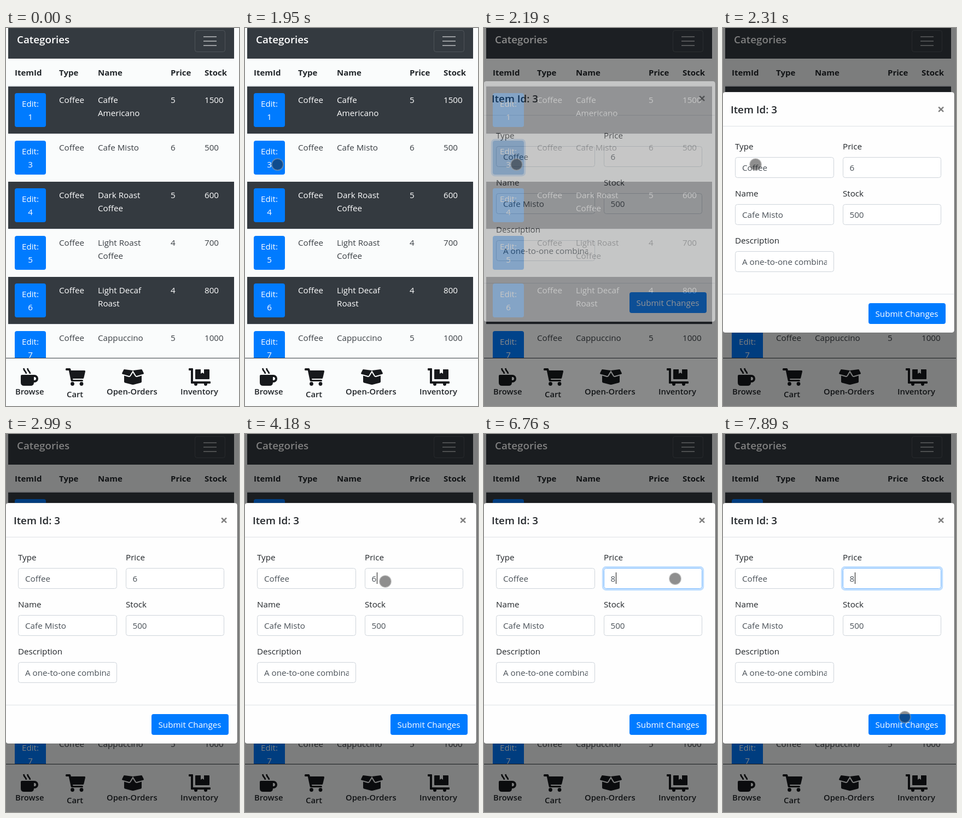
Write an HTML page that moves like this. It is 426 by 691 pixels and loops after 8 s.

```html
<!DOCTYPE html>
<html lang="en">
<head>
<meta charset="utf-8">
<title>Inventory editor</title>
<style>
  html, body { margin: 0; width: 100%; height: 100%; overflow: hidden; background: #fafcfc; }
  svg { display: block; }
  text { font: 15.2px "Open Sans", "Noto Sans", sans-serif; fill: #212529; white-space: pre; }
  .b { font-weight: 700; font-size: 15px; }
  .s { font-weight: 600; font-size: 14.8px; }
  .h { font-weight: 600; font-size: 18.8px; }
  .x { font-weight: 700; font-size: 24px; fill: #7f7f7f; }
  .w { fill: #fff; }
  .l { fill: #3a3f44; }
  .i { fill: #495057; }
  .m { text-anchor: middle; }
  .field { fill: #fff; stroke: #ced4da; }
  .icon { fill: #17191c; fill-rule: evenodd; }
</style>
</head>
<body>
<svg id="stage" width="426" height="691" viewBox="0 0 426 691"></svg>
<script>
const text = (x, y, s, cls = '') => `<text x="${x}" y="${y}" class="${cls}">${s}</text>`;
const box = (x, y, w, h, fill, r = 0, more = '') =>
  `<rect x="${x}" y="${y}" width="${w}" height="${h}" rx="${r}" fill="${fill}" ${more}/>`;
const disc = (x, y, r) => `<circle cx="${x}" cy="${y}" r="${r}"/>`;
const field = (x, y, w, id = '') => box(x + .5, y + .5, w - 1, 37, '', 4, `class="field" ${id}`);

const columns = [['ItemId', 16], ['Type', 97], ['Name', 168], ['Price', 301], ['Stock', 363]];
const items = [
  [1, 'Caffe|Americano', 5, 1500], [3, 'Cafe Misto', 6, 500],
  [4, 'Dark Roast|Coffee', 5, 600], [5, 'Light Roast|Coffee', 4, 700],
  [6, 'Light Decaf|Roast', 4, 800], [7, 'Cappuccino', 5, 1000]
];

function row([id, name, price, stock], i) {
  const y = 107 + 87 * i, dark = i % 2 === 0, cls = dark ? 'w' : 'l';
  const back = dark ? box(4, y, 413, 86, '#343a40') : box(4, y - 1, 413, 1, '#dee2e6');
  const ring = id === 3
    ? box(14.4, y + 10.4, 60.2, 65.2, 'none', 5.5, 'id="ring" stroke="#8fc4fb" stroke-width="3.2"') : '';
  return back + ring + box(16, y + 12, 57, 62, '#007bff', 4, `id="edit${id}"`) +
    text(44.5, y + 37, 'Edit:', 'w m') + text(44.5, y + 61, id, 'w m') +
    text(97, y + 30, 'Coffee', cls) +
    name.split('|').map((s, k) => text(168, y + 30 + 24 * k, s, cls)).join('') +
    text(301, y + 30, price, cls) + text(363, y + 30, stock, cls);
}

const icons = `<g class="icon">
  <path d="M27 636q0-2 2-2h23a7 7 0 0 1 0 14h-1q0 6-6 6h-12q-6 0-6-6zM51 638v6h1a3 3 0 0 0 0-6z"/>
  <path d="M32.3 622q.5 3.500 2.600 5.500t2.100 4.500m2.300-10q.5 3.500 2.600 5.500t2.100 4.500" fill="none" stroke="#17191c" stroke-width="2.700"/>
  <path d="M110.500 622h6q1.500 0 1.800 1.600l.5 2.400h24.700q1.900 0 1.500 1.900l-2.700 11.500q-.4 1.600-1.900 1.600h-18.300l.4 2h16.800q1.900 0 1.500 1.900l-.3 1.100h-20q-1.500 0-1.800-1.600l-3.900-18.400h-4.300q-1.500 0-1.500-1.500v-1q0-1.500 1.500-1.500z"/>
  ${disc(121.5, 650.5, 3.4)}${disc(138, 650.5, 3.4)}
  <path d="M232 626l-15.600-2q-.8 0-1.100.6l-3.200 6.400q-.4 1.100.6 1.500l12.400 3.500q.8.100 1.200-.5zM232 626l15.600-2q.8 0 1.100.6l3.200 6.400q.4 1.100-.6 1.500l-12.400 3.500q-.8.100-1.200-.5zM232 630l4 6.600q1.200 1.900 3.500 1.300l8.500-2.500v11.200q0 1.500-1.500 1.900l-13.500 3.400q-1 .2-2 0l-13.500-3.400q-1.500-.4-1.500-1.900v-11.200l8.500 2.500q2.300.6 3.500-1.300z"/>
  <path d="M335 622h6q1 0 1 1v23h31q1 0 1 1v2q0 1-1 1h-34q-1 0-1-1v-23h-3q-1 0-1-1v-2q0-1 1-1zM347 624h9v8l3-2 3 2v-8h9q1 0 1 1v16q0 1-1 1h-24q-1 0-1-1v-16q0-1 1-1z"/>
  ${disc(347, 651, 3)}${disc(365, 651, 3)}
</g>`;

const page = box(0, 0, 426, 691, '#fafcfc') + box(4, 0, 413, 56, '#343a40') +
  text(20, 28, 'Categories', 'h w') +
  box(345.5, 4.5, 55, 39, 'none', 4, 'stroke="#fff" stroke-opacity=".13"') +
  '<path d="M361 16h24m-24 8h24m-24 8h24" stroke="#fff" stroke-opacity=".5" stroke-width="2"/>' +
  columns.map(([s, x]) => text(x, 87, s, 'b')).join('') +
  box(4, 105, 413, 2, '#dee2e6') + items.map(row).join('') +
  box(0, 603, 426, 88, '#fafcfc') + box(0, 603, 426, 1, '#343a40') + icons +
  text(17, 670, 'Browse', 's') + text(111, 675, 'Cart', 's') +
  text(184, 670, 'Open-Orders', 's') + text(319, 670, 'Inventory', 's');

const dialog = box(-.5, 126, 423.5, 440, '#fefefe', 4.5, 'stroke="#000" stroke-opacity=".2"') +
  text(14, 165, 'Item Id: 3', 'h') + text(398.5, 165.5, '×', 'x m') +
  box(0, 188, 423, 1, '#dee2e6') + box(0, 495, 423, 1, '#dee2e6') +
  text(22, 231, 'Type') + text(219, 231, 'Price') + text(22, 317, 'Name') +
  text(219, 317, 'Stock') + text(22, 403, 'Description') +
  box(217.4, 243.4, 183.2, 41.2, 'none', 5.5, 'id="focus" stroke="#bfdeff" stroke-width="3.2"') +
  field(22, 245, 181) + field(219, 245, 180, 'id="price"') +
  field(22, 331, 181) + field(219, 331, 180) + field(22, 417, 181) +
  text(35, 270, 'Coffee', 'i') + '<text id="value" class="i" x="231.5" y="270"></text>' +
  text(35, 356, 'Cafe Misto', 'i') + text(231.5, 356, '500', 'i') +
  `<svg x="35" y="417" width="155" height="38">${text(0, 25, 'A one-to-one combination', 'i')}</svg>` +
  box(0, 253, 1, 21, '#111', 0, 'id="caret"') +
  box(266, 512, 141, 38, '#007bff', 4) + text(278.5, 537, 'Submit Changes', 'w');

document.getElementById('stage').innerHTML = page +
  box(0, 0, 426, 691, '#000', 0, 'id="shade"') + `<g id="dialog">${dialog}</g>` +
  '<circle id="pointer" r="10.5" fill="#1e1e1e" fill-opacity=".5" stroke="#a0a0a0" stroke-opacity=".5" stroke-width="2"/>';

// Held steps: [time, ...values]
const pointerSteps = [
  [0], [280, 275.5, 615], [430],
  [580, 205.5, 448.5], [700, 152, 376], [820, 108, 316], [940, 77, 274], [1060, 63, 254],
  [1180, 59.5, 249.5], [2990],
  [3240, 118.5, 256.5], [3360, 133.5, 260.5], [3510, 229.5, 269.5], [3660, 244.5, 269.5],
  [3810, 252, 269.5], [3930, 256.5, 269.5], [4320, 318.5, 266.5], [4470, 349.5, 264.5],
  [7260, 351.5, 260.5], [7530, 383, 302], [7650, 402.5, 388], [7770, 374, 478], [7890, 332.5, 517.5]
];
// shade, dialog opacity, dialog offset
const fadeSteps = [[0, 0, 0, -50], [2070, .39, 0, -50], [2190, .46, .52, -29], [2310, .5, 1, -9], [2460, .5, 1, 0]];
const caretSteps = [[0], [4180, 241], [4720], [5220, 241], [5620], [5740, 232], [6260], [6760, 241], [7260], [7770, 241]];
const valueSteps = [[0, '6'], [5740, ''], [6760, '8']];

const at = (steps, t) => steps.findLast(s => s[0] <= t).slice(1);
const el = id => document.getElementById(id);
const set = (id, attrs) => { for (const k in attrs) el(id).setAttribute(k, attrs[k]); };
const show = (id, on) => { el(id).style.display = on ? '' : 'none'; };

function draw(now) {
  const t = now % 8000;
  const [px, py] = at(pointerSteps, t), [shade, alpha, dy] = at(fadeSteps, t);
  const [caret] = at(caretSteps, t), pressed = t >= 2070, focused = t >= 4320;
  show('pointer', px !== undefined);
  if (px !== undefined) set('pointer', { cx: px, cy: py });
  set('shade', { opacity: shade });
  set('dialog', { opacity: alpha, transform: `translate(0 ${dy})` });
  show('ring', pressed);
  set('edit3', { fill: pressed ? '#0069d9' : '#007bff' });
  show('focus', focused);
  el('price').style.stroke = focused ? '#80bdff' : '';
  show('caret', caret !== undefined);
  if (caret !== undefined) set('caret', { x: caret });
  el('value').textContent = at(valueSteps, t)[0];
}

function tick() {
  draw(performance.now());
  requestAnimationFrame(tick);
}
tick();
</script>
</body>
</html>
```
